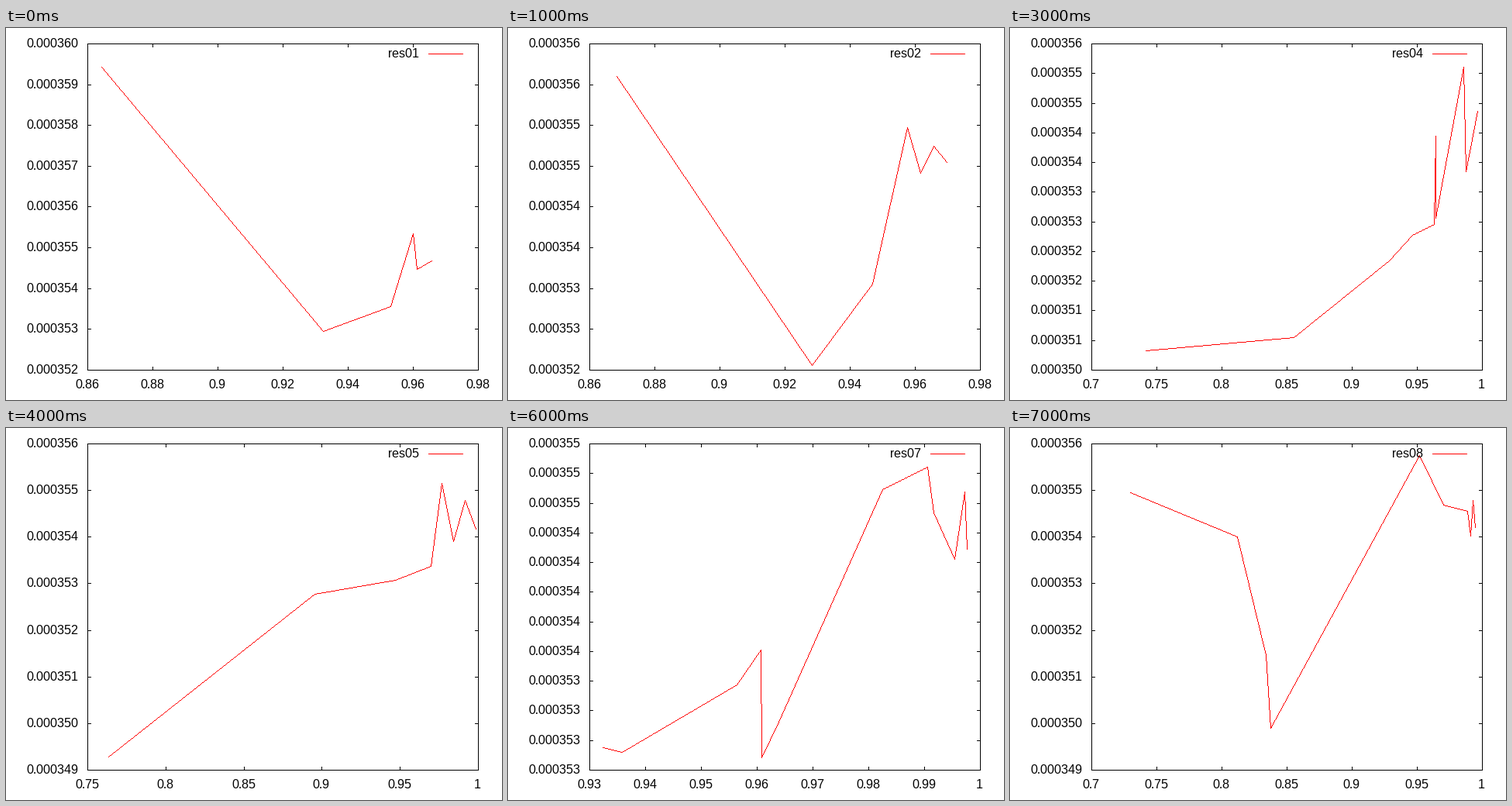
Write a matplotlib script that moves like this. It is 640x480 px and loops after 8 s.

```python
import math

import numpy as np
import matplotlib.pyplot as plt
from matplotlib.animation import FuncAnimation

W, H, DPI = 640, 480, 80
TOP, BOTTOM, RIGHT = 20, 441, 609
TICK = 4
RED, BLACK = (255, 0, 0), (0, 0, 0)
FONT = dict(family="Liberation Sans", size=16 * 72 / DPI, color="black",
            ha="left", va="baseline")

# Native hinting on whole pixels gives thin, crisp strokes.
plt.rcParams["text.hinting"] = "native"
plt.rcParams["text.hinting_factor"] = 1


def swing(start, end_x, mid, decay, n):
    """Zigzag from start to end_x that dies away around the height mid."""
    x, y = start
    return [(round(x + (end_x - x) * k / (n - 1)),
             round(mid + (y - mid) * (-decay) ** k)) for k in range(n)]


# Each plot: x range, y range in millionths, label decimals, curve in pixels.
PLOTS = [
    ((0.86, 0.98), (352, 360), 6,
     [(123, 50), (409, 391), (496, 359), (525, 265), (530, 311), (549, 300)]),
    ((0.86, 0.98), (352, 356), 6,
     [(140, 62), (392, 435), (470, 330)] + swing((515, 128), 566, 165, 0.6, 4)),
    ((0.75, 1), (351, 362), 5,
     [(191, 55), (326, 430), (423, 223), (426, 378), (463, 285), (560, 255),
      (583, 315)] + swing((603, 290), 606, 300, 0.5, 2)),
    ((0.7, 1), (350, 355.5), 6,
     [(175, 416), (366, 399), (489, 300), (519, 267), (547, 253), (549, 139),
      (549, 245), (585, 50), (588, 185), (603, 107)]),
    ((0.75, 1), (349, 356), 6,
     [(132, 424), (398, 214), (502, 196)] + swing((548, 178), 606, 115, 0.7, 5)),
    ((0.7, 1), (348, 356), 6,
     [(175, 436), (225, 344), (375, 169), (524, 161), (526, 116), (530, 116)]
     + swing((558, 165), 584, 134, 0.8, 5) + swing((602, 62), 607, 96, 0.35, 3)),
    ((0.93, 1), (352.8, 355), 6,
     [(122, 412), (147, 418), (295, 331), (326, 286), (327, 425), (349, 379),
      (483, 79), (541, 50), (549, 109), (576, 169), (589, 82), (592, 156)]),
    ((0.7, 1), (349, 356), 6,
     [(155, 83), (293, 140), (330, 293), (336, 387), (528, 35), (559, 99),
      (590, 107)] + swing((594, 139), 600, 113, 0.77, 3)),
]


def tick_values(lo, hi):
    """Ticks at a step of 1, 2 or 5 times a power of ten, at most 11 intervals."""
    span = hi - lo
    base = 10 ** math.floor(math.log10(span / 11))
    step = next(m * base for m in (1, 2, 5, 10) if span / (m * base) < 11.01)
    return [lo + k * step for k in range(round(span / step) + 1)]


def line(img, a, b, color):
    """Hard-edged line, one pixel wide."""
    n = max(abs(b[0] - a[0]), abs(b[1] - a[1])) + 1
    xs = np.rint(np.linspace(a[0], b[0], n)).astype(int)
    ys = np.rint(np.linspace(a[1], b[1], n)).astype(int)
    img[ys, xs] = color


def polyline(img, points, color):
    for a, b in zip(points, points[1:]):
        line(img, a, b, color)


def advance(s):
    """Width of a number in pixels."""
    return sum(4.45 if c == "." else 8.9 for c in s)


fig = plt.figure(figsize=(W / DPI, H / DPI), dpi=DPI, facecolor="white")
ax = fig.add_axes([0, 0, 1, 1])


def draw(i):
    x_range, y_range, digits, curve = PLOTS[i]
    left = 45 + 10 * digits
    ax.clear()
    ax.set_axis_off()
    img = np.full((H, W, 3), 255, np.uint8)

    for v in tick_values(*y_range):
        part = (v - y_range[0]) / (y_range[1] - y_range[0])
        y = round(BOTTOM - (BOTTOM - TOP) * part)
        line(img, (left, y), (left + TICK, y), BLACK)
        line(img, (RIGHT - TICK, y), (RIGHT, y), BLACK)
        units = math.floor(v * 10 ** (digits - 6) + 0.5)
        label = f"{units / 10 ** digits:.{digits}f}"
        ax.text(int(left - 12 - advance(label)), y + 5, label, **FONT)

    for v in tick_values(*x_range):
        part = (v - x_range[0]) / (x_range[1] - x_range[0])
        x = round(left + (RIGHT - left) * part)
        line(img, (x, TOP), (x, TOP + TICK), BLACK)
        line(img, (x, BOTTOM - TICK), (x, BOTTOM), BLACK)
        label = f"{round(v, 4):g}"
        ax.text(int(x - advance(label) / 2), 465, label, **FONT)

    polyline(img, [(left, TOP), (RIGHT, TOP), (RIGHT, BOTTOM), (left, BOTTOM),
                   (left, TOP)], BLACK)
    polyline(img, curve, RED)
    line(img, (545, 33), (589, 33), RED)
    ax.text(493, 38, f"res{i + 1:02d}", **FONT)

    ax.imshow(img, extent=(0, W, H, 0), aspect="auto", interpolation="nearest")
    ax.set_xlim(0, W)
    ax.set_ylim(H, 0)
    return []


anim = FuncAnimation(fig, draw, frames=len(PLOTS), interval=1000, repeat=True)
plt.show()
```
